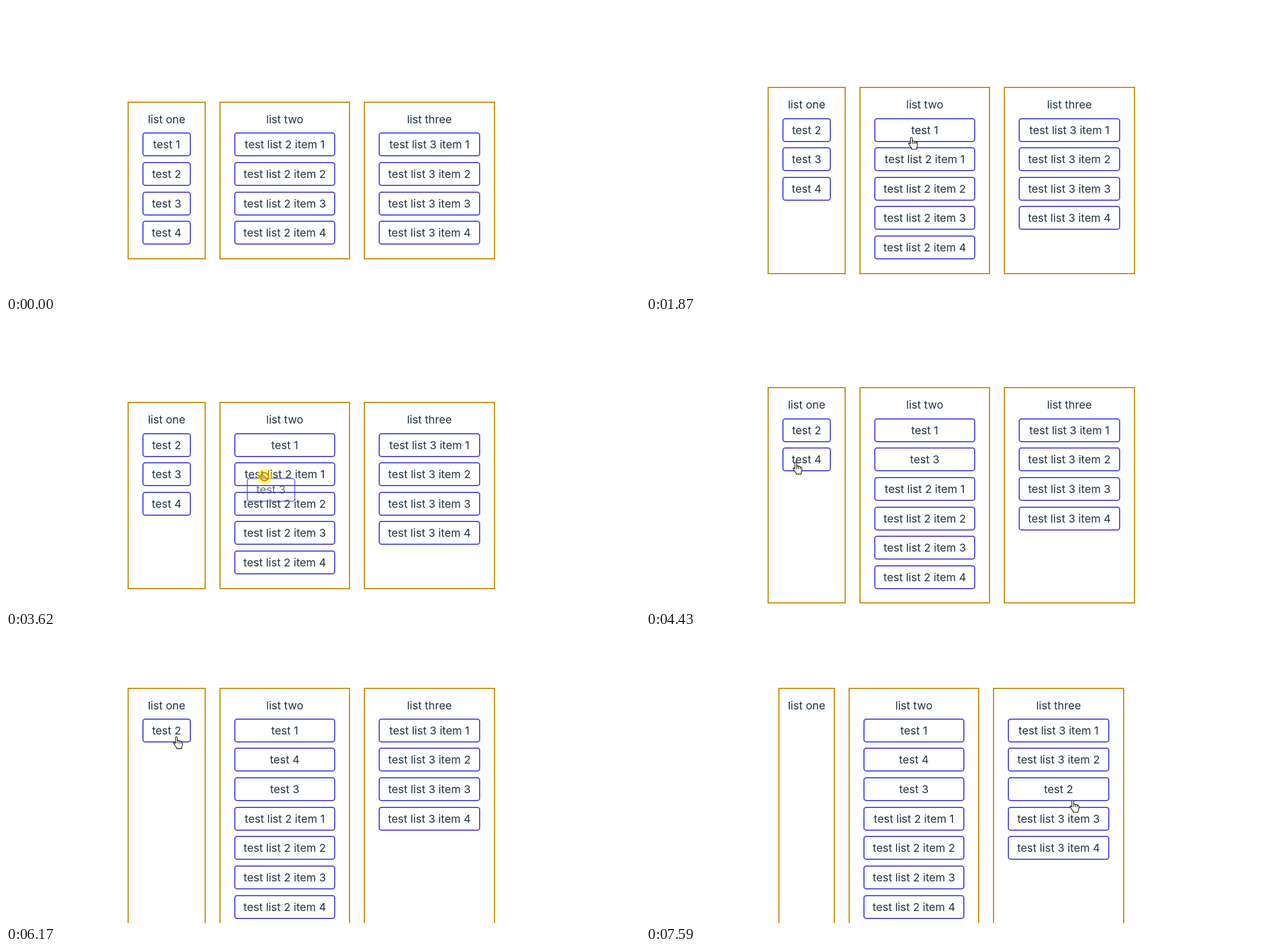
An HTML page for the animation above (8000 ms loop, 1111 by 504 pixels).

```html
<!DOCTYPE html>
<html lang="en">
<head>
<meta charset="utf-8">
<title>Drag between lists</title>
<style>
  html, body { margin: 0; width: 100%; height: 100%; overflow: hidden; background: #fff; }
  svg { display: block; width: 1111px; height: 504px; }
  text {
    font: 400 19.35px Inter, sans-serif;
    font-optical-sizing: none;
    fill: #213547;
    text-anchor: middle;
  }
  .panel, .item { fill: none; stroke-width: 2; }
  .panel { stroke: #ca8a04; }
  .item { stroke: #4f46e5; }
  .cursor { fill: #fff; stroke: #111; stroke-width: 1.2; stroke-linejoin: round; }
  .blocked { fill: none; stroke: #e67a0a; stroke-width: 2.2; }
</style>
</head>
<body>
<svg id="stage" viewBox="0 0 1111 504"></svg>
<script>
const LOOP = 8000, STEP = 66;
const CENTER_X = 535, GAP = 24, INSET = 26, ROW = 51.6, CARD_H = 42;
const stage = document.getElementById('stage');
const numbered = prefix => [1, 2, 3, 4].map(n => prefix + n);

const PANELS = [
  { title: 'list one', w: 137, emptyW: 99, items: numbered('test ') },
  { title: 'list two', w: 229, items: numbered('test list 2 item ') },
  { title: 'list three', w: 230, items: numbered('test list 3 item ') },
];

// Each leg carries the pointer on from where the previous one ended.
const ENTRY = [748, 393];
const LEGS = [
  { start: 390, end: 1060, to: [276, 241.5], bow: -30 },
  { press: 1260, start: 1460, end: 1870, to: [465, 230], bow: 4, name: 'test 1', list: 1, index: 0 },
  { start: 2270, end: 2750, to: [270, 249], bow: -18 },
  { press: 2950, start: 3160, end: 3690, to: [453, 273.5], bow: 0, name: 'test 3', list: 1, index: 1 },
  { start: 4020, end: 4500, to: [262.5, 247.5], bow: -48 },
  { press: 4760, start: 4960, end: 5490, to: [462, 251], bow: 5, name: 'test 4', list: 1, index: 1 },
  { start: 5960, end: 6400, to: [289.5, 168], bow: 25 },
  { press: 6780, start: 6920, end: 7590, to: [748, 288], bow: 0, name: 'test 2', list: 2, index: 2 },
];
const DRAGS = LEGS.filter(leg => leg.press);

const HAND = 'M0 .5C1.2 .5 1.6 1.4 1.6 2.4V8Q2 6.8 3.4 7Q4.8 7.2 4.8 8.6Q5.4 7.4 6.6 7.8Q7.9 8.2 7.9 9.6' +
  'Q8.6 8.8 9.5 9.3Q10.6 9.8 10.6 11V14Q10.6 17 9.2 19V21.5H.5V19.5Q-2 17 -3.5 14Q-5.5 11.5 -4.8 10.7' +
  'Q-3.5 9.8 -1.6 12.2V2.4C-1.6 1.4 -1.2 .5 0 .5ZM1.6 8V12M4.8 8.6V12.2M7.9 9.6V12.6';
const ARROW = 'M0 0V16.5L4 12.8L6.6 18.6L9 17.5L6.4 11.9H11.8Z';

const rect = (cls, x, y, w, h, r = 0) =>
  `<rect class="${cls}" x="${x + 1}" y="${y + 1}" width="${w - 2}" height="${h - 2}" rx="${r}"/>`;
const label = (x, y, s) => `<text x="${x}" y="${y}">${s}</text>`;
const card = c => rect('item', c.x, c.y, c.w, CARD_H, 4) + label(c.x + c.w / 2, c.y + 28, c.name);

const legIndex = t => LEGS.findLastIndex(leg => leg.start <= t);

// The pointer advances in discrete steps counted from the start of each leg.
function snap(t) {
  const start = LEGS[legIndex(t)]?.start ?? 0;
  return start + Math.floor((t - start + 8) / STEP) * STEP;
}

function pointerAt(t) {
  const i = legIndex(t);
  if (i < 0) return ENTRY;
  const leg = LEGS[i], from = i ? LEGS[i - 1].to : ENTRY;
  const begin = leg.start - (i ? STEP : 0), end = leg.end - (leg.press ? STEP : 0);
  const k = Math.min(1, (t - begin) / (end - begin));
  const e = 1 - (1 - k) ** (leg.press ? 2 : 4);
  return [
    from[0] + (leg.to[0] - from[0]) * e,
    from[1] + (leg.to[1] - from[1]) * e + leg.bow * Math.sin(Math.PI * e),
  ];
}

function layout(t) {
  const lists = PANELS.map(p => [...p.items]);
  for (const d of DRAGS.filter(d => t >= d.end)) {
    lists[0] = lists[0].filter(name => name !== d.name);
    lists[d.list].splice(d.index, 0, d.name);
  }
  const extra = Math.max(...lists.map(l => l.length)) - 4;
  const top = 168 - extra * ROW / 2;
  const widths = PANELS.map((p, i) => lists[i].length ? p.w : p.emptyW);
  let x = CENTER_X - (widths.reduce((a, b) => a + b) + 2 * GAP) / 2;
  const panels = PANELS.map((p, i) => {
    const panel = { title: p.title, x, w: widths[i], y: Math.round(top), h: Math.round(277 + extra * ROW) };
    x += widths[i] + GAP;
    return panel;
  });
  const cards = lists.flatMap((list, i) => list.map((name, row) => ({
    name,
    x: panels[i].x + INSET,
    w: panels[i].w - 2 * INSET,
    y: Math.round(top + 54.3 + row * ROW),
  })));
  return { panels, cards };
}

function pointer(t, [x, y], drag, cards) {
  const disc = drag ? '<circle r="14" fill="#ff0" fill-opacity=".5"/>' : '';
  const over = cards.some(c => x >= c.x && x <= c.x + c.w && y >= c.y - 2 && y <= c.y + CARD_H + 2);
  const shape = drag && t >= drag.start
    ? '<g class="blocked"><circle r="7"/><path d="M-5-5L5 5"/></g>'
    : `<path class="cursor" d="${over ? HAND : ARROW}"/>`;
  return `<g transform="translate(${x} ${y})">${disc}${shape}</g>`;
}

function render(t) {
  const { panels, cards } = layout(t);
  const time = snap(t);
  const drag = DRAGS.find(d => t >= d.press && t < d.end);
  let out = panels.map(p => rect('panel', p.x, p.y, p.w, p.h) +
    label(p.x + p.w / 2, p.y + 37.5, p.title)).join('') + cards.map(card).join('');

  if (drag && t >= drag.start) {
    const [x0, y0] = pointerAt(drag.press), [x, y] = pointerAt(time - 10);
    const held = cards.find(c => c.name === drag.name);
    out += `<g opacity=".7">${card({ ...held, x: held.x + x - x0, y: held.y + y - y0 + 3 })}</g>`;
  }
  if (t >= LEGS[0].start) out += pointer(t, pointerAt(time), drag, cards);
  stage.innerHTML = out;
}

const origin = performance.now();
function tick() {
  render((performance.now() - origin) % LOOP);
  requestAnimationFrame(tick);
}
render(0);
requestAnimationFrame(tick);
</script>
</body>
</html>
```
